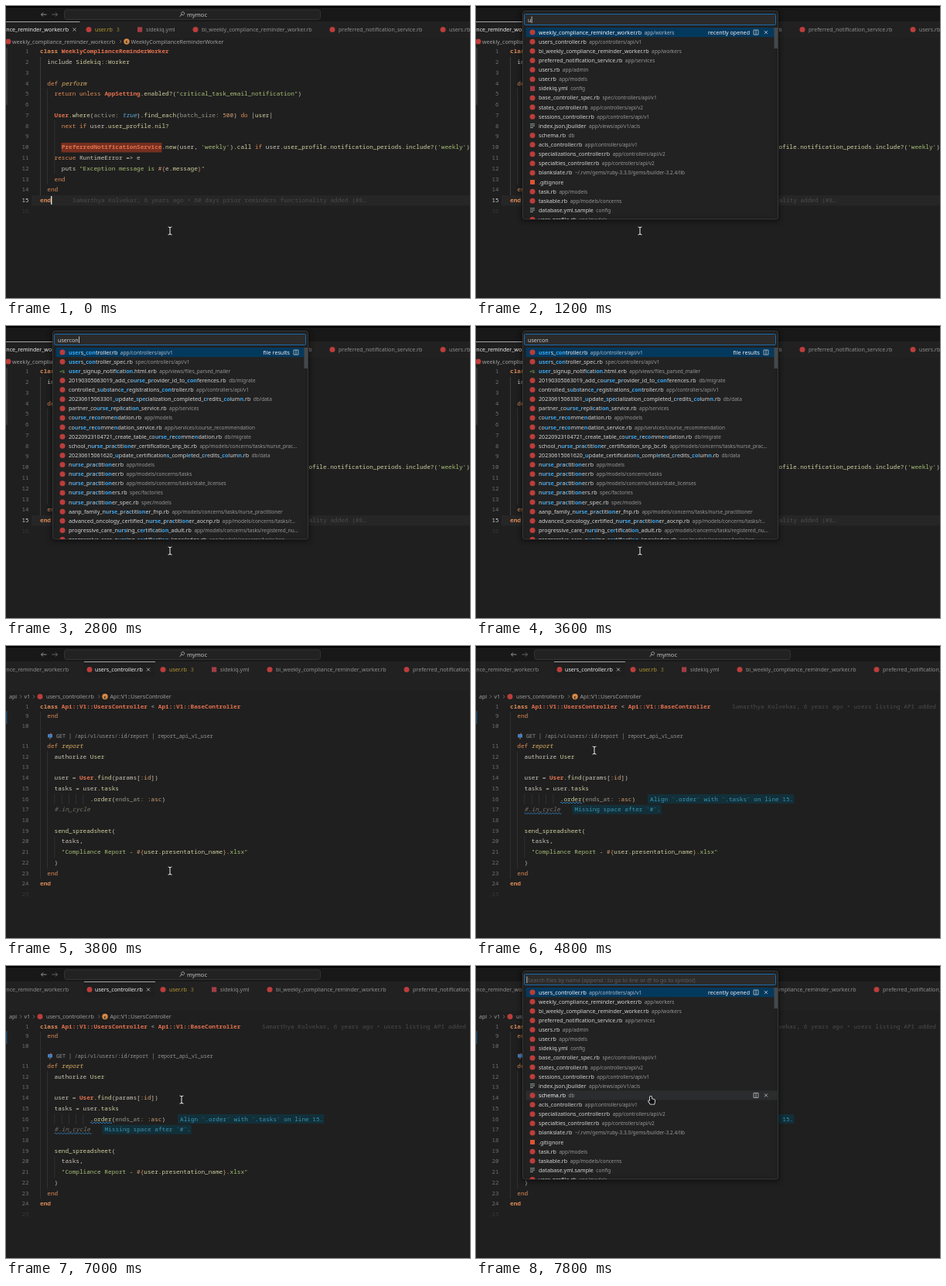
An HTML page with a canvas for the animation above (8000 ms loop, 600x378 px).

```html
<!DOCTYPE html>
<html lang="en">
<head>
<meta charset="utf-8">
<title>Quick open</title>
<style>
html, body { margin: 0; width: 100%; height: 100%; overflow: hidden; background: #1f1f1f; }
canvas { display: block; width: 600px; height: 378px; }
</style>
</head>
<body>
<canvas id="stage"></canvas>
<script>
const canvas = document.getElementById('stage');
const ctx = canvas.getContext('2d');
const ratio = window.devicePixelRatio || 1;
canvas.width = 600 * ratio;
canvas.height = 378 * ratio;

const UI = '"Noto Sans", sans-serif';
const MONO = '"Noto Sans Mono", monospace';
const CHAR = 4.632, LEFT = 44, ROW = 12.12;
const RUBY = '#bb3d3b';

// Code markup: "~x" switches to style x
const styles = {
  f: ['#c9c5b8', ''], k: ['#dc8a55', ''], b: ['#e08c58', 'bold '], c: ['#e2714e', 'bold '],
  s: ['#a8bf78', ''], m: ['#cfd0a0', ''], d: ['#d9ad62', 'italic '], v: ['#5aa9d6', 'italic '],
  g: ['#9a968c', ''], n: ['#d59a6a', ''], h: ['#77736b', 'italic ']
};

const workerCode = [
  '~bclass ~cWeeklyComplianceReminderWorker',
  '  ~finclude ~mSidekiq~f::~mWorker',
  '',
  '  ~kdef ~dperform',
  '    ~kreturn unless ~cAppSetting~m.enabled?~f(~s"critical_task_email_notification"~f)',
  '',
  '    ~cUser~m.where~f(~gactive: ~vtrue~f)~m.find_each~f(~gbatch_size: ~n500~f) ~kdo ~f|~muser~f|',
  '      ~knext if ~fuser~m.user_profile.nil?',
  '',
  "      ~cPreferredNotificationService~m.new~f(user, ~s'weekly'~f)~m.call ~kif ~fuser~m.user_profile.notification_periods.include?~f(~s'weekly'~f)",
  '    ~krescue ~fRuntimeError => e',
  '      ~fputs ~s"Exception message is ~n#{~fe~m.message~n}~s"',
  '    ~kend',
  '  ~kend',
  '~bend'
];
const controllerHead = '~bclass ~cApi::V1::UsersController ~f< ~cApi::V1::BaseController';
const controllerCode = [
  '  ~kdef ~dreport',
  '    ~fauthorize ~mUser',
  '',
  '    ~fuser = ~cUser~m.find~f(params[~n:id~f])',
  '    ~ftasks = user~m.tasks',
  '              ~m.order~f(~gends_at: ~n:asc~f)',
  '    ~h#.in_cycle',
  '',
  '    ~msend_spreadsheet~f(',
  '      ~ftasks,',
  '      ~s"Compliance Report - ~n#{~muser.presentation_name~n}~s.xlsx"',
  '    ~f)',
  '  ~kend',
  '~bend'
];

const lines = text => text.trim().split('\n');
const recent = lines(`
weekly_compliance_reminder_worker.rb app/workers
users_controller.rb app/controllers/api/v1
bi_weekly_compliance_reminder_worker.rb app/workers
preferred_notification_service.rb app/services
users.rb app/admin
user.rb app/models
sidekiq.yml config
base_controller_spec.rb spec/controllers/api/v1
states_controller.rb app/controllers/api/v2
sessions_controller.rb app/controllers/api/v1
index.json.jbuilder app/views/api/v1/acls
schema.rb db
acls_controller.rb app/controllers/api/v1
specializations_controller.rb app/controllers/api/v2
specialties_controller.rb app/controllers/api/v2
blankslate.rb ~/.rvm/gems/ruby-3.3.0/gems/builder-3.2.4/lib
.gitignore
task.rb app/models
taskable.rb app/models/concerns
database.yml.sample config
user_profile.rb app/models`);
const recentAfter = [recent[1], recent[0], ...recent.slice(2)];
// A leading "-" starts the "file results" group
const userFiles = lines(`
user.rb app/models
users.rb app/admin
user_file.rb app/models
user_spec.rb spec/models
user_profile.rb app/models
user_profiles.rb app/admin
user_profiles.rb spec/factories
users_controller.rb app/controllers/api/v1
user_profile_spec.rb spec/models
-users.rb spec/factories
user_type.rb app/models/partner_taxonomy/ethos_ce/specialty
user_files.rb app/admin
user_files.rb spec/factories
user_file.rake lib/tasks
user_policy.rb app/policies
user_file_spec.rb spec/models
user_decorator.rb app/decorators/api/v1
user_file_service.rb app/services/search
user_sync_service.rb app/services/data_sync/ethos_ce
user_decorator_spec.rb spec/decorators/api/v1
users_controller_spec.rb spec/controllers/api/v1`);
const controllerFiles = lines(`
users_controller.rb app/controllers/api/v1
users_controller_spec.rb spec/controllers/api/v1
user_signup_notification.html.erb app/views/files_parsed_mailer
20190305063019_add_course_provider_id_to_conferences.rb db/migrate
controlled_substance_registrations_controller.rb app/controllers/api/v1
20230615063301_update_specialization_completed_credits_column.rb db/data
partner_course_replication_service.rb app/services
course_recommendation.rb app/models
course_recommendation_service.rb app/services/course_recommendation
20220923104721_create_table_course_recommendation.rb db/migrate
school_nurse_practitioner_certification_snp_bc.rb app/models/concerns/tasks/nurse_prac…
20230615061620_update_certifications_completed_credits_column.rb db/data
nurse_practitioner.rb app/models
nurse_practitioner.rb app/models/concerns/tasks
nurse_practitioner.rb app/models/concerns/tasks/state_licenses
nurse_practitioners.rb spec/factories
nurse_practitioner_spec.rb spec/models
aanp_family_nurse_practitioner_fnp.rb app/models/concerns/tasks/nurse_practitioner
advanced_oncology_certified_nurse_practitioner_aocnp.rb app/models/concerns/tasks/r…
progressive_care_nursing_certification_adult.rb app/models/concerns/tasks/registered_nu…
progressive_care_nursing_certification_knowledge.rb app/models/concerns/tasks/reg…`);

function rect(x, y, w, h, color) {
  ctx.fillStyle = color;
  ctx.fillRect(x, y, w, h);
}
function box(x, y, w, h, r, fill, border) {
  ctx.beginPath();
  ctx.roundRect(x, y, w, h, r);
  ctx.fillStyle = fill;
  ctx.fill();
  ctx.strokeStyle = border;
  ctx.lineWidth = 1;
  ctx.stroke();
}
function dot(x, y, color, r = 3.5) {
  ctx.fillStyle = color;
  ctx.beginPath();
  ctx.arc(x, y, r, 0, 7);
  ctx.fill();
}
function stroke(path, x, y, color, width = 0.8) {
  ctx.save();
  ctx.translate(x, y);
  ctx.strokeStyle = color;
  ctx.lineWidth = width;
  ctx.stroke(new Path2D(path));
  ctx.restore();
}
// Draws text centred on y and returns its right edge
function label(text, x, y, color, size = 7.12, font = UI, weight = '', align = 'left') {
  ctx.font = `${weight}${size}px ${font}`;
  ctx.fillStyle = color;
  ctx.textAlign = align;
  ctx.fillText(text, x, y + 2.5);
  return x + ctx.measureText(text).width;
}
const labelRight = (text, x, y, color) => label(text, x, y, color, 7.12, UI, '', 'right');
const mono = (text, x, y, color, size = 7.72, weight = '', align) =>
  label(text, x, y, color, size, MONO, weight, align);
const cross = (x, y) => stroke('M-2-2L2 2M2-2L-2 2', x, y, '#cccccc');
const chevron = (x, y) => stroke('M-1-2L1 0L-1 2', x, y, '#8a8a8a', 0.7);
const splitIcon = (x, y) => stroke('M-3-3H3V3H-3ZM0-3V3', x, y, '#c5c5c5', 0.8);

function codeLine(markup, y) {
  const parts = markup.split(/~(.)/);
  let col = 0, style = 'f';
  parts.forEach((part, i) => {
    if (i % 2) { style = part; return; }
    const [color, weight] = styles[style];
    mono(part, LEFT + col * CHAR, y, color, 7.72, weight);
    col += part.length;
  });
}
const lineNumber = (n, y, color = '#6a6f76') => mono(n, 29.5, y, color, 7.5, '', 'right');
const guide = (col, from, to, color = '#383838') =>
  rect(LEFT + col * CHAR, from, 0.7, to - from, color);

function fileIcon(name, x, y) {
  if (/\.jbuilder$|\.sample$/.test(name)) stroke('M-3-2.5H3M-3-.2H3M-3 2.1H1', x, y, '#a8b0b5', 0.9);
  else if (/\.yml$/.test(name)) rect(x - 3, y - 3.2, 6.2, 6.4, '#a33c46');
  else if (/gitignore$/.test(name)) rect(x - 3, y - 3, 6, 6, '#dc5532');
  else if (/\.erb$/.test(name)) mono('<%', x - 4, y, '#6da05a', 6, 'bold ');
  else dot(x, y, RUBY);
}

function titleBar() {
  stroke('M3.5 0H-3.5M-1-2.5L-3.5 0L-1 2.5', 49, 11, '#b0b0b0');
  stroke('M-3.5 0H3.5M1-2.5L3.5 0L1 2.5', 63, 11, '#777777');
  box(75.5, 5, 331, 12.5, 3, '#222222', '#333333');
  stroke('M-1-.2A2 2 0 1 1 2.6-1.8A2 2 0 0 1-1-.2L-3.2 2.8', 228, 11, '#b5b5b5', 0.8);
  label('mymoc', 234, 11, '#c4c4c4', 7.5);
}

function tabs(shift) {
  rect(0, 20, 600, shift ? 38.5 : 21, '#212121');
  const activeX = shift ? 101 : 0, activeW = shift ? 92 : 95.5;
  rect(activeX, 20, activeW, 21, '#1f1f1f');
  rect(activeX, 20, activeW, 0.8, '#c8c8c8');
  labelRight('weekly_compliance_reminder_worker.rb', 81, 30.5, shift ? '#8f8f8f' : '#f0f0f0');
  if (shift) {
    dot(108, 30.5, RUBY);
    label('users_controller.rb', 115, 30.5, '#f0f0f0');
    cross(184, 30.5);
  } else cross(88.5, 30.5);
  [['user.rb', 115], ['sidekiq.yml', 181], ['bi_weekly_compliance_reminder_worker.rb', 253],
   ['preferred_notification_service.rb', 430], ['users.rb', 573]].forEach(([name, x], i) => {
    fileIcon(name, x + shift - 8, 30.5);
    label(name, x + shift, 30.5, i ? '#8f8f8f' : '#b79a2c');
  });
  label('3', 143 + shift, 30.5, '#9a8330', 6.6);
}

function classIcon(x, y) {
  dot(x, y, '#d98b45', 3.7);
  label('c', x - 1.6, y - 0.3, '#1f1f1f', 6, UI, 'bold ');
}

function workerEditor(focused) {
  const lineY = i => 58.8 + 13.77 * i;
  tabs(0);
  rect(0, 54, 2, 74, '#353535');
  dot(3, 46, RUBY);
  label('weekly_compliance_reminder_worker.rb', 8, 46, '#a0a0a0');
  chevron(148, 46);
  classIcon(156, 46);
  label('WeeklyComplianceReminderWorker', 161.5, 46, '#a0a0a0');
  rect(33, 245, 567, 13.5, '#262626');
  rect(71.5, 177, 130, 12.5, '#752f20');
  guide(0, 66, 245, '#4a4a4a');
  guide(2, 107, 231);
  guide(4, 148, 217);
  workerCode.forEach((code, i) => {
    lineNumber(i + 1, lineY(i), i === 14 ? '#d0d0d0' : undefined);
    codeLine(code, lineY(i));
  });
  lineNumber(16, lineY(15), '#383838');
  mono('Samarthya Kolvekar, 6 years ago • 60 days prior reminders functionality added (#8…',
    86, 251.5, '#4b4b4b');
  if (focused) rect(58, 246, 1.4, 11, '#e0e0e0');
}

function hint(text, x, y) {
  rect(x - 3, y - 6, text.length * CHAR + 4, 12, '#12303a');
  mono(text, x, y, '#3c93ae');
}
function squiggle(x, y, width) {
  let path = 'M0 0';
  for (let i = 0; i < width; i += 4) path += 'q1-1.6 2 0t2 0';
  stroke(path, x, y, '#3794e0', 0.8);
}

function controllerEditor(ready) {
  const lineY = i => 129.4 + 13.72 * i;
  tabs(96);
  rect(0, 84, 1.5, 17, '#1f4a6c');
  label('api', 4, 65.5, '#a0a0a0');
  chevron(19, 65.5);
  label('v1', 23.5, 65.5, '#a0a0a0');
  chevron(36, 65.5);
  dot(44, 65.5, RUBY);
  label('users_controller.rb', 52, 65.5, '#a0a0a0');
  chevron(120, 65.5);
  classIcon(128, 65.5);
  label('Api::V1::UsersController', 134.5, 65.5, '#a0a0a0');

  guide(0, 85, 301);
  guide(2, 136, 288);
  for (let col = 4; col < 14; col += 2) guide(col, 191.5, 205);
  guide(4, 246, 274);
  lineNumber(9, 90);
  codeLine('  ~kend', 90);
  lineNumber(10, 103.5);
  rect(3, 72, 597, 13, '#1f1f1f');
  lineNumber(1, 78.5);
  codeLine(controllerHead, 78.5);

  rect(54, 114, 6, 4.5, '#3f7fc4');
  rect(57.5, 112.5, 1, 3, '#d65a4a');
  rect(56.3, 118, 1.4, 2.5, '#8a6a4a');
  mono('GET | /api/v1/users/:id/report | report_api_v1_user', 65, 116, '#969696', 6.63);

  controllerCode.forEach((code, i) => {
    lineNumber(i + 11, lineY(i));
    codeLine(code, lineY(i));
  });
  lineNumber(25, lineY(14), '#383838');
  if (!ready) return;
  mono('Samarthya Kolvekar, 6 years ago • users listing API added', 331, 78.5, '#4b4b4b');
  hint('Align `.order` with `.tasks` on line 15.', 225, lineY(5));
  hint('Missing space after `#`.', 127.5, lineY(6));
  squiggle(109, lineY(5) + 5, 27);
  squiggle(62.5, lineY(6) + 5, 46);
}

// Positions of the query letters in name, or null when they do not all occur in order
function fuzzy(name, query) {
  const hits = [];
  let at = -1;
  for (const letter of query) {
    at = name.indexOf(letter, at + 1);
    if (at < 0) return null;
    hits.push(at);
  }
  return hits;
}

function fileRow(entry, i, query, hovered, resultsOnly) {
  const y = 34.1 + i * ROW;
  const grouped = entry[0] === '-';
  const [name, path = ''] = entry.slice(grouped ? 1 : 0).split(' ');
  const selected = i === 0;
  if (selected || hovered) rect(64.5, y - 6.1, 325, ROW, selected ? '#04395e' : '#2a2c2d');
  if (grouped) {
    rect(64.5, y - 6.1, 321, 0.6, '#3f3f3f');
    labelRight('file results', 380, y, '#3794e0');
  }
  fileIcon(name, 73, y);
  const hits = fuzzy(name, query) || [];
  const plain = selected || hovered ? '#f4f4f4' : '#d6d6d6';
  let x = 81;
  for (let from = 0; from < name.length;) {
    const hit = hits.includes(from);
    let to = from + 1;
    while (to < name.length && hits.includes(to) === hit) to++;
    x = label(name.slice(from, to), x, y, hit ? '#36a6f2' : plain, 7.12, UI, hit ? 'bold ' : '');
    from = to;
  }
  label(path, x + 3.5, y, selected ? '#b0bcc6' : '#979797', 6.5);
  if (selected && resultsOnly) {
    labelRight('file results', 367, y, '#f0f0f0');
    splitIcon(375, y);
  } else if (selected || hovered) {
    if (selected) labelRight('recently opened', 354, y, '#f0f0f0');
    splitIcon(362, y);
    cross(375, y);
  }
}

function palette(t) {
  const reopened = t >= 7800;
  const keyTimes = [1200, 1400, 1600, 1800, 2000, 2400, 2600];
  const query = reopened ? '' : 'usercon'.slice(0, keyTimes.filter(k => k <= t).length);
  const resultsOnly = !reopened && t >= 2800;
  const filtering = !reopened && t >= 1400;
  let rows = reopened ? recentAfter : filtering ? resultsOnly ? controllerFiles : userFiles : recent;
  if (filtering) rows = rows.filter(row => fuzzy(row.split(' ')[0], query));
  const bottom = Math.min(276, 30 + rows.length * ROW);

  ctx.save();
  ctx.shadowColor = '#000a';
  ctx.shadowBlur = 6 * ratio;
  ctx.shadowOffsetY = ratio;
  box(60.5, 6.5, 330, bottom - 6.5, 3, '#222222', '#363636');
  ctx.restore();
  box(62.5, 10.5, 325, 14, 1, '#2b2b2b', '#1a69ab');

  const end = label(query, 67, 18, '#d0d0d0');
  if (!query) label('Search files by name (append : to go to line or @ to go to symbol)', 66.5, 18, '#5c5c5c');
  const blinkedOff = (t >= 800 && t < 1000) || (t >= 3400 && !reopened);
  if (!blinkedOff) rect(query ? end + 0.3 : 65.5, 13.5, 0.8, 8.5, '#d8d8d8');

  ctx.save();
  ctx.beginPath();
  ctx.rect(61, 27, 329, bottom - 27);
  ctx.clip();
  rows.forEach((row, i) => fileRow(row, i, filtering ? query : '', reopened && i === 11, resultsOnly));
  if (rows.length > 20) rect(385.5, 28, 4.5, 27, '#45484a');
  ctx.restore();
}

// time, x, y
const mousePath = [
  [4200, 212, 291], [4800, 153, 135], [5000, 54, 82], [5200, 120, 116],
  [5400, 286, 118], [6400, 240, 122], [6600, 270, 124], [7000, 227, 173]
];
function mouse(t) {
  let [, x, y] = mousePath[0];
  mousePath.forEach(([time, px, py], i) => {
    if (!i || t < mousePath[i - 1][0]) return;
    const [t0, x0, y0] = mousePath[i - 1];
    const p = Math.min(1, (t - t0) / (time - t0));
    x = x0 + (px - x0) * p;
    y = y0 + (py - y0) * p;
  });
  const arrow = t >= 5200 && t < 6800;
  if (!arrow && t < 7800) {
    const beam = 'M-2.5-5Q0-5 0-3.5Q0-5 2.5-5M0-3.5V3.5M-2.5 5Q0 5 0 3.5Q0 5 2.5 5';
    stroke(beam, x, y, '#000000', 2.2);
    stroke(beam, x, y, '#f2f2f2', 1.1);
    return;
  }
  const shape = new Path2D(arrow
    ? 'M0 0V9.5L2.2 7.6L3.8 11L5.3 10.3L3.8 7H6.6Z'
    : 'M-2-3.5Q-1-5 0-3.5V-1L3.4 0Q4.4.5 4.2 2L3.4 5.8H-1.4L-4 2Q-3.6.6-2 1.8Z');
  ctx.save();
  ctx.translate(x, y);
  ctx.fillStyle = '#111111';
  ctx.strokeStyle = '#f2f2f2';
  ctx.lineWidth = 1.6;
  ctx.lineJoin = 'round';
  ctx.stroke(shape);
  ctx.fill(shape);
  ctx.restore();
}

function draw(now) {
  const t = Math.floor(now % 8000 / 200) * 200;
  const open = (t >= 200 && t < 3800) || t >= 7800;
  ctx.setTransform(ratio, 0, 0, ratio, 0, 0);
  rect(0, 0, 600, 378, '#1f1f1f');
  rect(0, 0, 600, 20, '#181818');
  rect(0, 0, 600, 2, '#000000');
  if (!open) titleBar();
  if (t < 3800) workerEditor(!open);
  else controllerEditor(t >= 4000);
  if (open) palette(t);
  mouse(t);
}

const start = performance.now();
function loop() {
  draw(performance.now() - start);
  requestAnimationFrame(loop);
}
loop();
</script>
</body>
</html>
```
